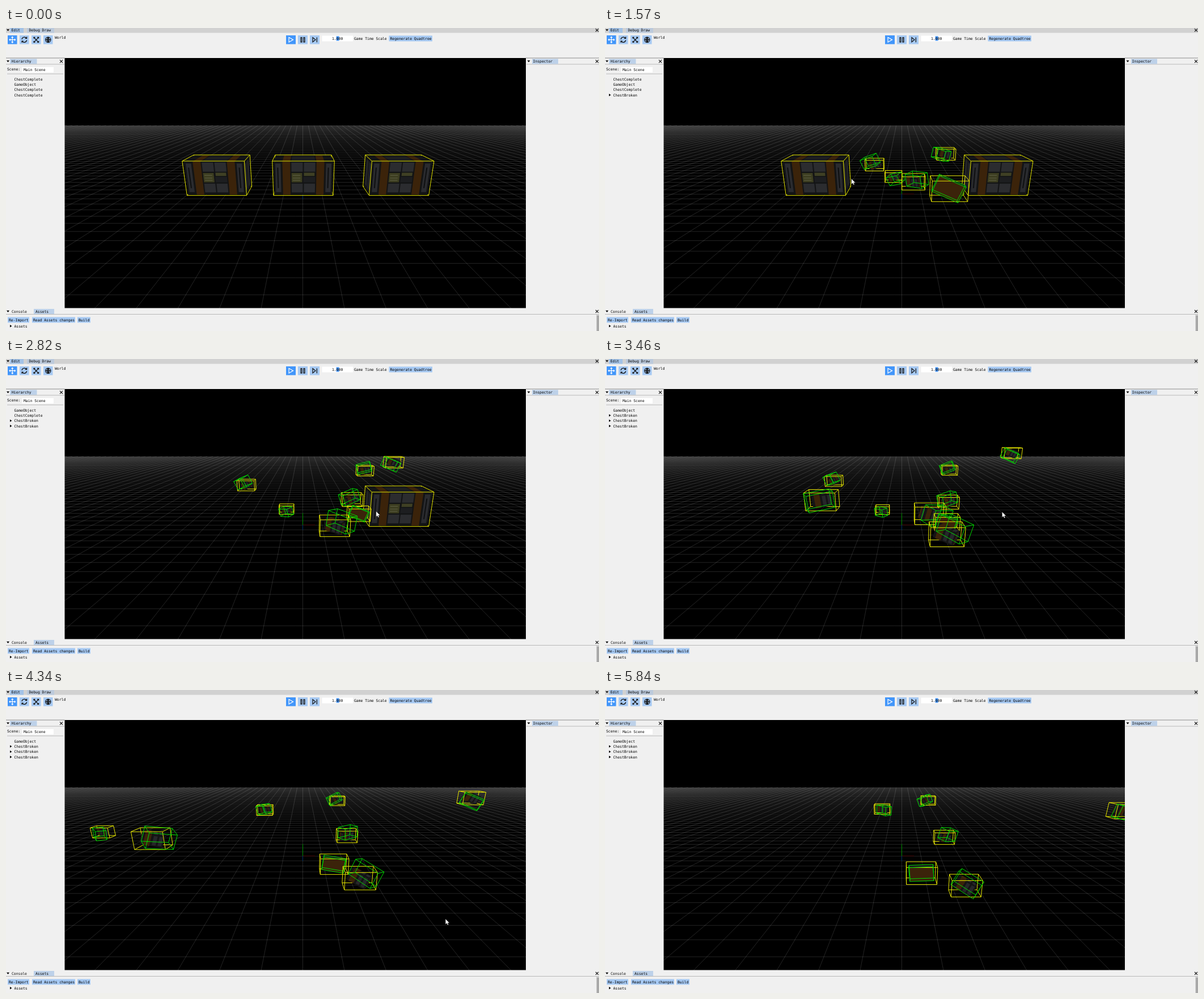
These frames come from a looping animation (1046 by 535 pixels, 5950 ms). An HTML page with a canvas:

```html
<!DOCTYPE html>
<html lang="en">
<head>
<meta charset="utf-8">
<title>Scene editor</title>
<style>
html, body { margin: 0; width: 100%; height: 100%; overflow: hidden; background: #f0f0f0; }
canvas, svg { position: absolute; left: 0; top: 0; width: 1046px; height: 535px; }
text { font: 6.4px "DejaVu Sans Mono", "Liberation Mono", monospace; fill: #000; white-space: pre; text-rendering: geometricPrecision; }
.btn { fill: #a6c9f3; }
.on { fill: #4296fa; }
.tab { fill: #bdd1e9; }
.in { fill: #fff; }
.ink { fill: none; stroke: #111; stroke-width: 1.2; }
.wink { fill: none; stroke: #fff; stroke-width: 1.2; }
.rule { stroke: #b9b9b9; stroke-width: 1; }
</style>
</head>
<body>
<canvas id="floor" width="1046" height="535"></canvas>
<canvas id="stage" width="1046" height="535"></canvas>
<svg viewBox="0 0 1046 535">
  <!-- toolbar -->
  <path fill="#f0f0f0" d="M0 0H1046V53H0ZM0 53H103.5V494.5H0ZM917 53H1046V494.5H917ZM0 494.5H1046V535H0Z"/>
  <rect width="1046" height="8.6" fill="#d1d1d1"/>
  <rect x="7" width="24" height="8.6" fill="#a3c2e6"/>
  <rect x="37" width="48" height="8.6" fill="#bccadc"/>
  <text x="9.5" y="6.2">Edit</text><text x="40.5" y="6.2">Debug Draw</text>
  <rect class="on" x="3" y="13" width="16.5" height="15.5"/>
  <rect class="btn" x="24" y="13" width="16.5" height="15.5"/>
  <rect class="btn" x="45" y="13" width="16.5" height="15.5"/>
  <rect class="btn" x="66" y="13" width="16.5" height="15.5"/>
  <path class="wink" d="M11.2 15.5V26M6 20.7H16.5M9.6 17.2 11.2 15.5 12.8 17.2M9.6 24.3 11.2 26 12.8 24.3M7.6 19.1 6 20.7 7.6 22.3M14.9 19.1 16.5 20.7 14.9 22.3"/>
  <path class="ink" d="M28 20A4.4 4.4 0 0 1 36 18M36.6 15.6V18.4H33.8M36.6 21.4A4.4 4.4 0 0 1 28.6 23.4M28 25.8V23H30.8"/>
  <path class="ink" d="M49 18.6V16.4H51.4M55 16.4H57.6V18.6M57.6 23V25.2H55M51.4 25.2H49V23M49.5 17 57 24.8M57 17 49.5 24.8"/>
  <path class="ink" d="M69.7 20.7A4.6 4.6 0 1 0 78.9 20.7 4.6 4.6 0 1 0 69.7 20.7H78.9M74.3 16.1V25.3M74.3 16.1Q70.5 20.7 74.3 25.3M74.3 16.1Q78.1 20.7 74.3 25.3"/>
  <text x="86" y="19">World</text>
  <rect class="on" x="494" y="13" width="17" height="15.5"/>
  <rect class="btn" x="515" y="13" width="17" height="15.5"/>
  <rect class="btn" x="536" y="13" width="17" height="15.5"/>
  <path class="wink" d="M499 16.5V25L506.5 20.7Z"/>
  <path class="ink" d="M520 16.8H522V24.8H520ZM525 16.8H527V24.8H525Z"/>
  <path class="ink" d="M541 16.8V24.8L546 20.8ZM548.4 16.5V25.2"/>
  <rect class="in" x="557.5" y="13.5" width="54.5" height="10"/>
  <rect class="on" x="582.6" y="14.5" width="5" height="8"/>
  <text x="575" y="21">1.000</text>
  <text x="614" y="21">Game Time Scale</text>
  <rect class="btn" x="675.5" y="13.5" width="76.5" height="10"/>
  <text x="677.5" y="21">Regenerate Quadtree</text>
  <!-- side panels -->
  <path stroke="#8c8c8c" d="M0 53H103.5M917 53H1046"/>
  <rect class="tab" x="7" y="54.5" width="47.5" height="9"/>
  <text x="10" y="61.2">Hierarchy</text>
  <path class="rule" d="M0 64H103M918 64H1046M2 81H101M0 505.5H1046"/>
  <text x="2" y="74.7">Scene:</text>
  <rect class="in" x="28" y="69" width="56" height="9.5"/>
  <text x="31" y="76.2">Main Scene</text>
  <g id="tree"></g>
  <rect class="tab" x="928" y="54.5" width="46" height="9"/>
  <text x="929.5" y="61.2">Inspector</text>
  <!-- assets -->
  <rect class="tab" x="49" y="496" width="36" height="9"/>
  <text x="10" y="502.7">Console</text><text x="52" y="502.7">Assets</text>
  <rect class="btn" x="3" y="510.5" width="38" height="9.8"/>
  <rect class="btn" x="46" y="510.5" width="76" height="9.8"/>
  <rect class="btn" x="126" y="510.5" width="23" height="9.8"/>
  <text x="5" y="517.7">Re-Import</text><text x="48" y="517.7">Read Assets changes</text><text x="128" y="517.7">Build</text>
  <path d="M7 524V528.4L10.4 526.2Z"/><text x="14.5" y="528.5">Assets</text>
  <rect x="1041" y="506" width="5" height="29" fill="#dcdcdc"/>
  <rect x="1042" y="507.5" width="4" height="27.5" fill="#a8a8a8"/>
  <path d="M1 2.2H6L3.5 5.6ZM1 57.2H6L3.5 60.6ZM919.5 57.2H924.5L922 60.6ZM1 498.7H6L3.5 502.1Z"/>
  <path class="ink" d="M1040 1.4 1045 6.4M1045 1.4 1040 6.4M95 56.3 100 61.3M100 56.3 95 61.3M1040 56.3 1045 61.3M1045 56.3 1040 61.3M1040 497.8 1045 502.8M1045 497.8 1040 502.8"/>
  <g id="mouse">
    <circle id="click" r="7" fill="#e8c21a" opacity=".62"/>
    <path d="M0 0V9.6L2.2 7.6 3.7 10.9 5.3 10.2 3.9 7H6.9Z" fill="#fff" stroke="#222" stroke-width=".4"/>
  </g>
</svg>
<script>
const LOOP = 5950, LAST = 5840;
const $ = id => document.getElementById(id);
const g = $('stage').getContext('2d');

// Camera: centre of the window, 60 degree lens, pitched down
const CX = 523, CY = 267.5, F = 463, HORIZON = 122;
const PITCH = Math.atan((CY - HORIZON) / F), S = Math.sin(PITCH), C = Math.cos(PITCH);
const BROWN = '#3b230a', YELLOW = '#e6e600', GREEN = '#00d800';

function clipView(c) {
  c.beginPath();
  c.rect(103, 53, 815, 442);
  c.clip();
}

function drawFloor() {
  const c = $('floor').getContext('2d'), N = 52, row = .00027, origin = .005835, col = .197;
  clipView(c);
  c.fillRect(0, 0, 1046, 535);
  const yAt = k => HORIZON + 1 / (origin + row * k), far = yAt(N);
  const line = (x0, y0, x1, y1, style) => {
    c.strokeStyle = style;
    c.beginPath();
    c.moveTo(x0, y0);
    c.lineTo(x1, y1);
    c.stroke();
  };
  const dim = 'rgba(255,255,255,.14)';
  for (let k = -12; k <= N; k++) line(0, yAt(k), 1046, yAt(k), dim);
  for (let i = -N; i <= N; i++) {
    const x = y => CX + .5 + i * col * (y - HORIZON);
    line(x(far), far, x(500), 500, dim);
  }
  line(523.5, 293, 545, 293, '#400');
  line(523.5, 293, 523.5, 302, '#036');
  line(523.5, 272, 523.5, 293, '#008c00');
}

// Maps box coordinates (-1..1 on each axis) around a screen point to the screen
function solid(o, w, h, d, yaw = 0, roll = 0) {
  const ca = Math.cos(yaw), sa = Math.sin(yaw), cb = Math.cos(roll), sb = Math.sin(roll);
  return (i, j, k) => {
    const x = i * w / 2, y = j * h / 2, z = k * d / 2;
    const x1 = x * ca + z * sa, z1 = z * ca - x * sa;
    const x2 = x1 * cb - y * sb, y2 = x1 * sb + y * cb;
    const s = F / (F + z1 * C - y2 * S);
    return [CX + (o.x - CX + x2) * s, CY - (CY - o.y + y2 * C + z1 * S) * s];
  };
}

// Corner bits: 1 right, 2 top, 4 back
function wire(at, color, part) {
  const p = [...Array(8).keys()].map(i => at(i & 1 ? 1 : -1, i & 2 ? 1 : -1, i & 4 ? 1 : -1));
  const hidden = i => (i & 6) === 4;
  g.strokeStyle = color;
  g.beginPath();
  for (const bit of [1, 2, 4]) for (let i = 0; i < 8; i++) {
    if (i & bit) continue;
    const behind = hidden(i) || hidden(i | bit);
    if (part && (part === 'back') !== behind) continue;
    g.moveTo(...p[i]);
    g.lineTo(...p[i | bit]);
  }
  g.stroke();
}

// Calls paint for each face turned to the viewer
function drawFaces(at, paint) {
  const faces = {
    front: (u, v) => at(2 * u - 1, 1 - 2 * v, -1),
    back: (u, v) => at(1 - 2 * u, 1 - 2 * v, 1),
    right: (u, v) => at(1, 1 - 2 * v, 2 * u - 1),
    left: (u, v) => at(-1, 1 - 2 * v, 1 - 2 * u),
    top: (u, v) => at(2 * u - 1, 1, 1 - 2 * v),
    bottom: (u, v) => at(2 * u - 1, -1, 2 * v - 1)
  };
  for (const name in faces) {
    const f = faces[name], [a, b, c] = [f(0, 0), f(1, 0), f(1, 1)];
    if ((b[0] - a[0]) * (c[1] - b[1]) <= (b[1] - a[1]) * (c[0] - b[0])) continue;
    paint((u, v, w, h, color) => {
      g.fillStyle = color;
      g.beginPath();
      for (const q of [f(u, v), f(u + w, v), f(u + w, v + h), f(u, v + h)]) g.lineTo(...q);
      g.fill();
    }, name);
  }
}

function paintChest(fill, name) {
  fill(0, 0, 1, 1, '#131415');
  if (name === 'left' || name === 'right') {
    for (const u of [.12, .56]) fill(u, .1, .32, .8, '#232427');
    return;
  }
  for (const u of [.15, .72]) fill(u, 0, .13, 1, BROWN);
  if (name === 'top') {
    fill(.3, .1, .4, .8, '#1c1d1f');
    return;
  }
  for (const u of [.03, .88]) {
    fill(u, .06, .09, .86, '#2a2b2f');
    fill(u + .03, .18, .02, .62, '#0f1011');
  }
  for (const u of [.3, .51]) for (const v of [.03, .66]) fill(u, v, .19, .27, '#2b2c2f');
  fill(.3, .34, .18, .28, '#3c3d20');
  for (const v of [.4, .48, .55]) fill(.32, v, .13, .025, '#55563a');
  fill(.5, .46, .2, .16, '#1d1e20');
  fill(.51, .33, .18, .1, '#3f4024');
}

function paintPlank(fill) {
  fill(0, 0, 1, 1, '#141415');
  fill(.12, 0, .28, 1, BROWN);
  for (const u of [.5, .76]) fill(u, .1, .17, .8, '#26272a');
}

function paintBrown(fill, name) {
  const main = name === 'front' || name === 'back';
  fill(0, 0, 1, 1, main ? BROWN : '#1c1c1d');
}

// Each chest breaks at a time, leaves a row of the tree, and its debris reaches a turning point
const chests = [
  { x: 524.4, gone: 900, row: 3, turn: 3460 },
  { x: 376.4, gone: 1940, row: 0, turn: 2820 },
  { x: 688, gone: 3000, row: 1, turn: 3460 }
];
chests.forEach(c => c.y = 258.8);

// Screen x, y and apparent width become a point in space, so paths are straight in depth
const toSpace = ([x, y, w]) => [(x - CX) / w, (y - CY) / w, 1 / w];
const mix = (a, b, p) => a.map((v, i) => v + (b[i] - v) * p);

const pieces = [];
function debris(chest, paint, turn, end = turn) {
  const points = [[chest.x, chest.y, 34], turn, end].map(toSpace);
  pieces.push({ chest, paint, points, seed: pieces.length + 1 });
}
const [middle, left, right] = chests;
debris(middle, paintPlank, [404, 215, 29], [489, 210, 27]);
debris(middle, paintPlank, [490, 266, 24], [-143, 235, 36]);
debris(middle, paintPlank, [602, 309, 59], [635, 345, 52]);
debris(middle, paintPlank, [717, 166, 30], [915, 213, 42]);
debris(middle, paintBrown, [28, 110, -139]); // ends up behind the camera
debris(left, paintPlank, [-60, 270, 52]);
debris(left, paintPlank, [40, 300, 48]);
debris(left, paintPlank, [633, 197, 28], [570, 195, 25]);
debris(left, paintBrown, [622, 273, 38], [558, 323, 53]);
debris(left, paintPlank, [610, 248, 35], [598, 260, 35]);
debris(right, paintPlank, [384, 249, 53], [-460, 260, 53]);
debris(right, paintPlank, [573, 273, 53], [48, 255, 54]);

// A fast burst up to the turning point, then a slow drift
function place({ chest, points: [a, b, c] }, t) {
  const p = Math.min(1, (t - chest.gone) / (chest.turn - chest.gone));
  const q = Math.min(1, Math.max(0, (t - chest.turn) / (LAST - chest.turn)));
  const [x, y, z] = p < 1 ? mix(a, b, p ** .75) : mix(b, c, 1 - (1 - q) ** 2);
  return { x: CX + x / z, y: CY + y / z, w: 1 / z };
}

function drawPiece({ chest, paint, seed }, o, t) {
  const { x, y, w } = o, age = (t - chest.gone) / 1000, brown = paint === paintBrown;
  const yaw = brown ? .1 : Math.sin(seed * 12.9 + age * .3) * .8;
  const roll = brown ? age * .15 - .5 : Math.sin(seed * 7.1 + age * .5) * .45;
  const sway = brown ? 0 : w * .25;
  const turned = {
    x: x + sway * Math.sin(seed * 4.3 + age * .5),
    y: y + sway * .7 * Math.cos(seed * 2.7 + age * .5)
  };
  const bounds = solid(o, w, w * .6, w * .5);
  const hull = brown
    ? solid(turned, w * .8, w * .5, w * .2, yaw, roll)
    : solid(turned, w * .85, w * .55, w * .5, yaw, roll);
  wire(bounds, YELLOW, 'back');
  drawFaces(brown ? hull : solid(o, w * .65, w * .42, w * .3, yaw * .7, roll), paint);
  wire(bounds, YELLOW, 'front');
  wire(hull, GREEN);
}

function drawChest(c) {
  const bounds = solid(c, 102, 60.3, 48);
  wire(bounds, YELLOW, 'back');
  drawFaces(solid(c, 99, 58.5, 45), paintChest);
  wire(bounds, YELLOW, 'front');
}

// Mouse stops: time, x, y
const stops = [[200, 863, 470], [770, 543, 263], [1020, 543, 263], [1890, 372, 268], [2130, 372, 268],
  [2900, 685, 269], [3480, 701, 270], [4340, 775, 404], [5140, 957, 523]];
function mouseAt(t) {
  const i = stops.findIndex(s => s[0] > t);
  if (i < 1) return stops[i < 0 ? stops.length - 1 : 0];
  const a = stops[i - 1], b = stops[i];
  return mix(a, b, (t - a[0]) / (b[0] - a[0]));
}

const tree = $('tree');
const rows = [0, 1, 2, 3].map(i => {
  const y = 92.6 + i * 9.3;
  tree.insertAdjacentHTML('beforeend',
    `<path d="M7 ${y - 4.5}v4.4l3.4-2.2z"/><text x="14.5" y="${y}"></text>`);
  return { arrow: tree.children[i * 2], label: tree.children[i * 2 + 1] };
});
function showTree(broken) {
  const names = ['ChestComplete', 'GameObject', 'ChestComplete', 'ChestComplete'];
  for (const c of broken) {
    names.splice(c.row, 1);
    names.push('ChestBroken');
  }
  rows.forEach((r, i) => {
    r.label.textContent = names[i];
    r.arrow.style.display = names[i] === 'ChestBroken' ? '' : 'none';
  });
}

function render(t) {
  g.clearRect(0, 0, 1046, 535);
  const items = chests.filter(c => t < c.gone).map(c => ({ y: c.y, draw: () => drawChest(c) }));
  for (const p of pieces) {
    const o = place(p, t);
    if (t < p.chest.gone || o.w < 0 || o.w > 250) continue;
    items.push({ y: o.y, draw: () => drawPiece(p, o, t) });
  }
  items.sort((a, b) => a.y - b.y).forEach(i => i.draw());
  showTree(chests.filter(c => t >= c.gone));

  const [, x, y] = mouseAt(t);
  $('mouse').setAttribute('transform', `translate(${x} ${y})`);
  $('mouse').style.display = t >= 200 && t < 5220 ? '' : 'none';
  $('click').style.display = chests.some(c => t > c.gone - 80 && t < c.gone + 105) ? '' : 'none';
}

drawFloor();
clipView(g);
const start = performance.now();
function tick() {
  render((performance.now() - start) % LOOP);
  requestAnimationFrame(tick);
}
tick();
</script>
</body>
</html>
```
